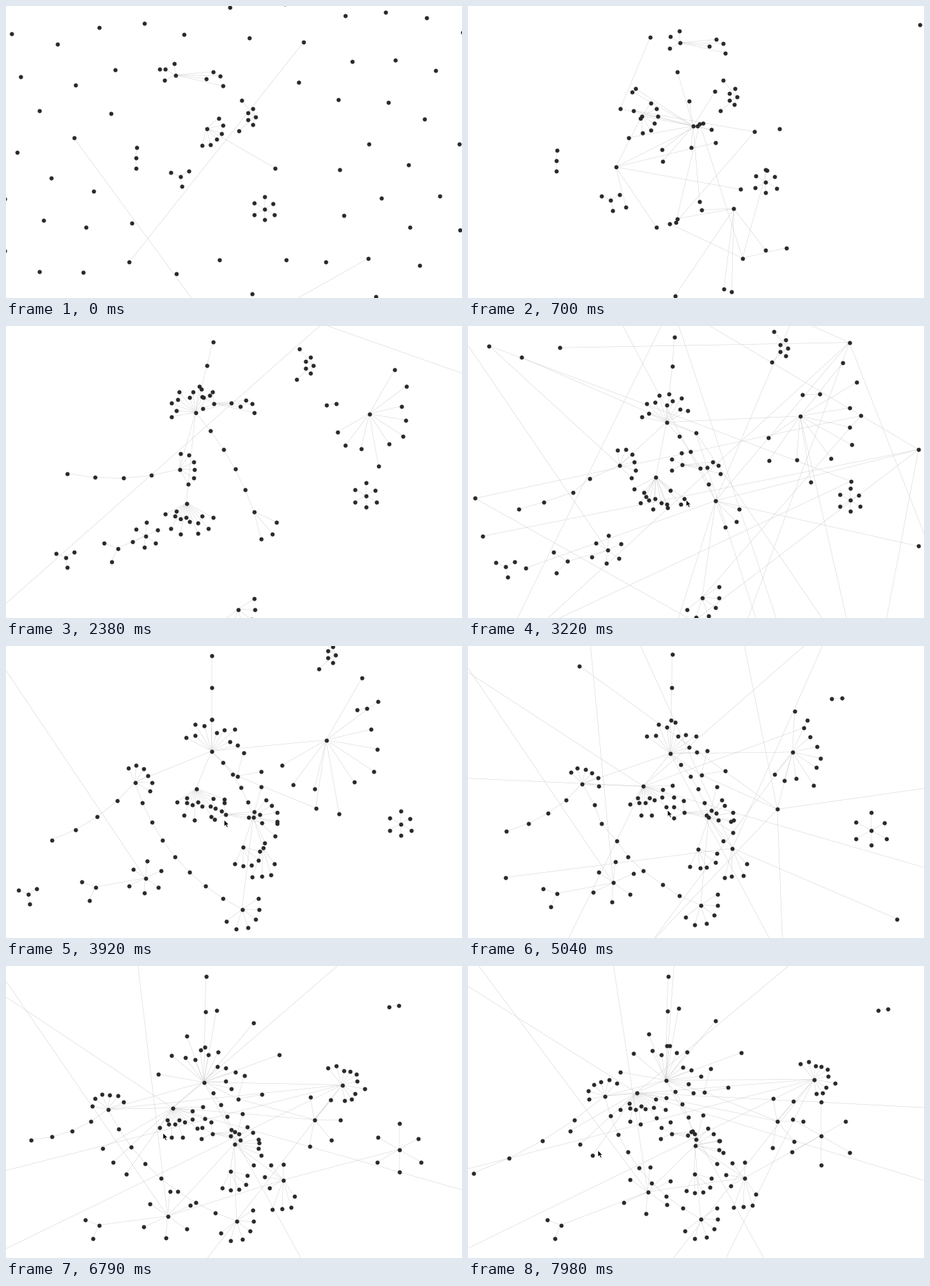
A matplotlib script that plays this animation: 656x421 px, repeating every 8000 ms.

```python
import numpy as np
import matplotlib.pyplot as plt
from matplotlib.animation import FuncAnimation
from matplotlib.collections import LineCollection
from matplotlib.patches import Polygon

W, H, DPI = 656, 421, 64
LOOP, TICK = 8000, 20
PX = 72 / DPI
KEYS = np.array([0, 1330, 2380, 3920, 5880, 6790, 7980.0])
CENTRE = np.array([318, 214.0])
GROWTH = np.array([1, 1.57, 2, 2, 2, 2, 2])
rng = np.random.default_rng(4)

tracks, joins, edges = [], [], []   # edges: child, parent, start time


def over(values):
    """Spread one or more values evenly over the loop and read them at the keys."""
    values = np.atleast_1d(values)
    return np.interp(KEYS, np.linspace(0, LOOP, len(values)), values)


def link(child, parent, join):
    since = KEYS[join - 1] + rng.uniform(-150, 700) if join else 0
    edges.append((child, parent, since))


def add(track, join, parent=None):
    tracks.append(track)
    joins.append(join)
    node = len(tracks) - 1
    if parent is not None:
        link(node, parent, join)
    return node


def hub(join, path, parent=None):
    """Add a node that follows `path` from key `join` on and rests at its end."""
    at = np.clip(np.arange(len(KEYS)) - join, 0, len(path) - 1)
    return add(np.array(path, float)[at], join, parent)


def ring(centre, n, radius, start, sweep, join=0, spread=0.0):
    """Place n nodes on an arc round a hub; radius and start may vary in time."""
    for i in range(n):
        a = np.radians(over(start) + sweep * i / max(n - 1, 1))
        r = over(radius) * (1 + spread * rng.uniform(-1, 1))
        offset = np.stack([r * np.cos(a), r * np.sin(a)], axis=1)
        add(tracks[centre] + offset, join, centre)


def chain(a, b, n, join=0, bow=0):
    """String n nodes between two hubs along a shallow arc."""
    gap = tracks[b] - tracks[a]
    side = gap[:, ::-1] * (-1, 1) / np.linalg.norm(gap, axis=1, keepdims=True)
    last = a
    for u in np.linspace(0, 1, n + 2)[1:-1]:
        last = add(tracks[a] + u * gap + 4 * u * (1 - u) * bow * side, join, last)
    link(b, last, join)


# detached clusters
cup = hub(0, [(359, 160), (411, 105), (442, 57), (474, 13), (503, -50)])
ring(cup, 4, 12, 107, 148)
ring(cup, 2, 31, 139, 91)
ring(hub(0, [(251, 246), (164, 307), (86, 334), (32, 358), (-40, 385)]), 3, 15, 79, 249)
ring(hub(0, [(187, 219), (72, 227), (-30, 235)]), 2, 15, -85, 175)
ring(hub(2, [(461, 114), (505, 92), (536, 67), (551, 59), (590, 64)]), 1, 15, -5, 0, 2)

# head and the line above it
head = hub(0, [(387, 234), (286, 137), (273, 125), (296, 152), (287, 158), (285, 168),
               (285, 165)])
ring(head, 10, (26, 28, 36, 36, 40), (-220, -200, -150, -135, -115), 140, 1, .3)
tip = hub(1, [(269, 48), (298, 23), (296, 14), (292, 12), (288, 15)])
chain(head, tip, 2, 1)

# left hand, arm and the bunch that ends up in the chest
left = hub(0, [(289, 177), (231, 150), (250, 207), (186, 197), (154, 202), (147, 207),
               (197, 188)], head)
ring(left, 6, 23, (-40, -192), 145, 0, .15)
elbow = hub(2, [(88, 213), (66, 280), (48, 256), (36, 251), (8, 299)])
chain(left, elbow, 3, 2, -10)
knot = hub(0, [(244, 100), (338, 29), (299, 112), (316, 243), (306, 239), (297, 242),
               (293, 242)])
ring(knot, 3, 17, 153, 113)
ring(knot, 4, (58, 30), -5, 18, 0, .25)

# torso
torso = hub(2, [(260, 256), (274, 206), (239, 202), (240, 205), (243, 183)], head)
ring(torso, 13, 33, (30, 30, 20, -10, 10), 125, 2, .5)
ring(torso, 3, (150, 110), 125, 25, 4)

# foot and the left leg
foot = hub(1, [(352, 418), (334, 409), (340, 380), (332, 371), (332, 368), (335, 365)])
ring(foot, 6, 28, -33, 175, 1, .15)
knee = hub(1, [(273, 266), (201, 303), (201, 335), (220, 347), (233, 361), (259, 326)])
ring(knee, 6, (17, 17, 24, 34, 34), -205, 300, 1, .12)
heel = hub(2, [(161, 321), (129, 348), (128, 364), (134, 374)], knee)
ring(heel, 2, 21, 115, 85, 2)
chain(left, foot, 7, 3, 25)

# right side of the body
hips = hub(1, [(385, 314), (357, 268), (356, 247), (337, 248), (329, 257), (327, 259)])
chain(head, hips, 4, 1, -8)
ring(hips, 3, 36, (40, -10), 50, 1, .2)
ring(hips, 5, 42, -75, 85, 3, .3)
rib = hub(1, [(336, 164), (324, 111), (333, 188), (337, 185), (334, 192), (340, 182)], head)
ring(rib, 2, 35, -75, 65, 3)
thigh = hub(3, [(370, 291), (392, 293), (399, 309), (398, 306)], hips)
ring(thigh, 4, 32, 55, 55, 3, .5)
ring(thigh, 4, 24, 150, 120, 4, .2)
shank = hub(3, [(341, 290), (327, 295), (323, 296), (326, 300)], hips)
ring(shank, 5, 26, 15, 100, 3, .2)

# right hand and wrist
right = hub(1, [(612, 254), (523, 127), (461, 136), (475, 166), (484, 172), (498, 164)])
ring(right, 10, (70, 60, 95, 30, 27), (-60, -60, -60, -130, -130), 210, 2, .3)
wrist = hub(3, [(446, 234), (445, 237), (444, 222), (445, 224)], right)
ring(wrist, 5, 32, -100, 200, 4, .25)

# far right star
star = hub(0, [(372, 293), (473, 234), (518, 245), (568, 257), (584, 270), (566, 265),
               (508, 245)])
ring(star, 6, (16, 17, 17, 27, 45), -150, 300, 0, .1)

# late arrivals round the head
ring(head, 6, 85, -170, 150, 5, .4)

# cross links
edges += [(left, torso, 4200), (head, right, 2900), (torso, wrist, 6000),
          (knee, thigh, 5900), (rib, wrist, 2500), (thigh, star, 6400),
          (foot, hips, 2600), (knee, hips, 6200), (left, right, 6300)]

# dots that stay free; a few get tied to the body by long lines
for i in range(70):
    node = add(np.zeros((len(KEYS), 2)), len(KEYS))
    if i % 6 == 0:
        edges.append((node, rng.choice([head, torso, right, knee]), rng.uniform(3000, 7900)))

# until it joins, a node sits on an outward growing sunflower
waiting = [i for i in np.argsort(joins, kind="stable") if joins[i]]
for k, i in enumerate(waiting, 18):
    a = k * np.pi * (3 - 5 ** .5)
    seat = 35.5 * k ** .5 * np.array([np.cos(a), np.sin(a)]) + rng.uniform(-5, 5, 2)
    tracks[i][:joins[i]] = (CENTRE + GROWTH[:, None] * seat)[:joins[i]]

P = np.array(tracks)
CHILD, PARENT = (np.array([e[k] for e in edges]) for k in (0, 1))
SINCE = np.array([e[2] for e in edges])

# monotone cubic tangents: smooth paths without overshoot
span = np.diff(KEYS)[None, :, None]
slope = np.diff(P, axis=1) / span
a, b = slope[:, :-1], slope[:, 1:]
same = a * b > 0
M = np.zeros_like(P)
M[:, 1:-1] = np.where(same, 2 * a * b / np.where(same, a + b, 1), 0)
M[:, 0], M[:, -1] = slope[:, 0], slope[:, -1]


def pose(t):
    k = min(np.searchsorted(KEYS, t, side="right") - 1, len(KEYS) - 2)
    h = KEYS[k + 1] - KEYS[k]
    u = (t - KEYS[k]) / h
    return ((1 + 2 * u) * (1 - u) ** 2 * P[:, k] + u * (1 - u) ** 2 * h * M[:, k]
            + u * u * (3 - 2 * u) * P[:, k + 1] + u * u * (u - 1) * h * M[:, k + 1])


# the picture steps every 70 ms and rests 140 ms between bursts
steps = [0]
for n in [6] + [6, 7] * 7 + [1]:
    begin = steps[-1] + 140
    steps += [begin + 70 * i for i in range(n)]
steps = np.array(steps)

fig = plt.figure(figsize=(W / DPI, H / DPI), dpi=DPI, facecolor="white")
ax = fig.add_axes([0, 0, 1, 1])
ax.set(xlim=(0, W), ylim=(H, 0))
ax.axis("off")
lines = LineCollection([], colors="#cccccc", linewidths=.45 * PX)
ax.add_collection(lines)
dots = ax.scatter([], [], s=(6 * PX) ** 2, c="#2a2a2a", linewidths=0, zorder=3)
ARROW = np.array([(0, 0), (0, 9), (2, 7), (3.8, 10.5), (5.2, 9.8), (3.7, 6.5), (6.3, 6.3)])
cursor = Polygon(ARROW, fc="black", ec="white", lw=.5 * PX, zorder=4)
ax.add_patch(cursor)


def draw(i):
    now = i * TICK + TICK / 2
    t = steps[np.searchsorted(steps, now, side="right") - 1]
    xy = pose(t) - .5
    dots.set_offsets(xy)
    on = SINCE <= t
    lines.set_segments(np.stack([xy[CHILD[on]], xy[PARENT[on]]], axis=1))
    tip_at = [np.interp(t, KEYS[3:], v) for v in ((314, 267, 226, 187), (251, 226, 241, 266))]
    cursor.set_xy(ARROW + tip_at)
    cursor.set_visible(bool(t >= 3220))
    return lines, dots, cursor


anim = FuncAnimation(fig, draw, frames=LOOP // TICK, interval=TICK, repeat=True,
                     repeat_delay=0, blit=False)
plt.show()
```
